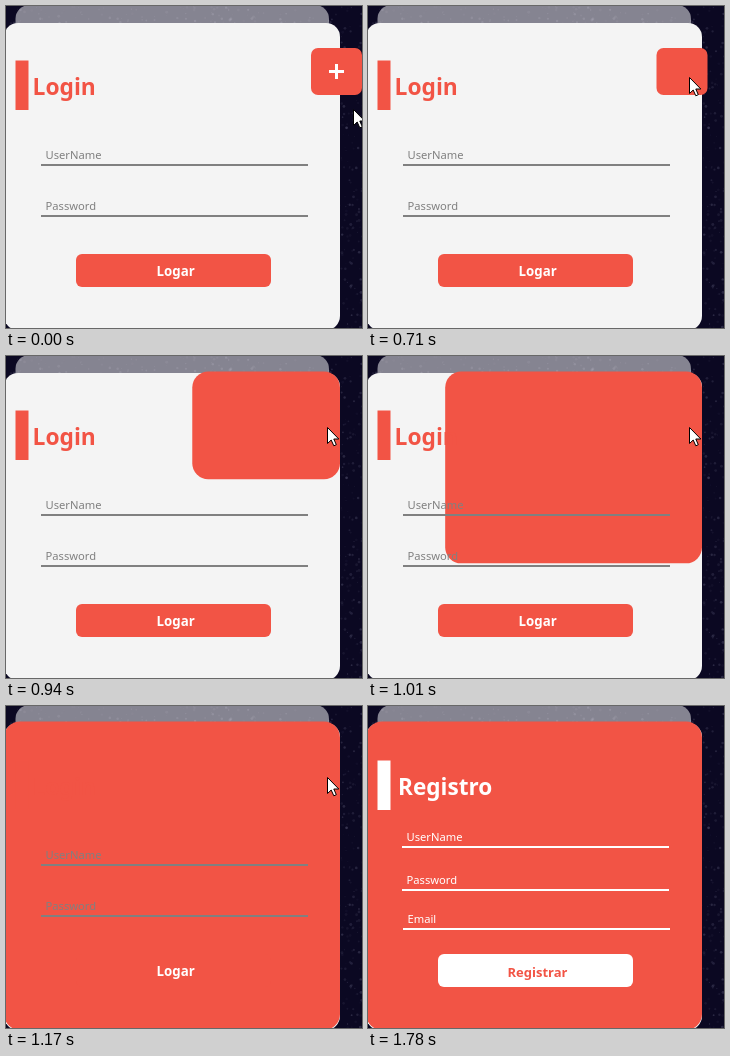
Write an HTML page with a canvas that moves like this. It is 356 px wide and 322 px high and loops after 2.48 s.

```html
<!DOCTYPE html>
<html lang="pt">
<head>
<meta charset="utf-8">
<title>Login</title>
<style>
html, body { margin: 0; width: 100%; height: 100%; overflow: hidden; background: #0b0822; }
canvas { display: block; }
</style>
</head>
<body>
<canvas id="stage" width="356" height="322"></canvas>
<script>
const c = document.getElementById('stage').getContext('2d');
const LOOP = 2480, STEP = LOOP / 32;
const RED = '#f25445', PAPER = '#f4f4f4', GRAY = '#808080', WHITE = '#fff';

// All times below are counted in steps.
const CLICK = 7, GROWN = 15, SWAP = 17, GONE = 23;

const mix = (a, b, p) => a + (b - a) * p;
const ramp = (k, from, to) => Math.min(1, Math.max(0, (k - from) / (to - from)));

// Soft start and soft end, settled at GROWN.
function grow(k, from, span) {
  if (k >= GROWN) return 1;
  return 1 - Math.exp(-((Math.max(0, k - from) / span) ** 2));
}

function rect(x, y, w, h, color, r = 0) {
  c.fillStyle = color;
  c.beginPath();
  c.roundRect(x, y, w, h, r);
  c.fill();
}

function text(s, x, y, size, color, weight, align = 'left') {
  c.font = `${weight} ${size}px "Noto Sans", "Open Sans", sans-serif`;
  c.textAlign = align;
  c.fillStyle = color;
  c.fillText(s, x, y);
}

function field(label, x, y, color) {
  text(label, x + 4.5, y - 5, 11.2, color, 400);
  rect(x, y, 267, 2, color);
}

function form(title, x, size, color) {
  rect(9.5, 54.5, 13, 49.5, color);
  text(title, x, 89, size, color, 700);
  rect(70, 248, 195, 33, color, 6);
}

function sky() {
  let seed = 7;
  const rnd = () => (seed = seed * 16807 % 2147483647) / 2147483647;
  const specks = (n, x, w, h) => {
    for (let i = 0; i < n; i++) {
      const d = 1 + 2 * rnd();
      rect(x + w * rnd(), h * rnd(), d, d, `rgba(150,150,180,${0.04 + 0.2 * rnd() ** 2})`, d / 2);
    }
  };
  rect(0, 0, 356, 322, '#0b0822');
  specks(150, 334, 22, 322);
  specks(120, 0, 334, 17);
  rect(9.5, -1, 313.5, 300, 'rgba(255,255,255,.5)', 14);
}

function redBox(k) {
  const slide = 22 * ramp(k, 6, 10), lift = ramp(k, 9, 12);
  const left = mix(305 - slide, -2, grow(k, 10.68, 2.05));
  const top = mix(42, 15.5, lift);
  const bottom = mix(89, 324, grow(k, 11.1, 2.27));
  rect(left, top, 356 - slide - left, bottom - top, RED, mix(7, 16, lift));
}

function plus() {
  rect(323, 64, 15, 3, WHITE);
  rect(329, 58, 3, 15, WHITE);
}

function loginForm() {
  form('Login', 26.5, 22.8, RED);
  field('UserName', 35, 158, GRAY);
  field('Password', 35, 209, GRAY);
  text('Logar', 169.7, 270, 13.3, WHITE, 700, 'center');
}

function registerForm() {
  form('Registro', 30, 22.6, WHITE);
  field('UserName', 34, 140, WHITE);
  field('Password', 34, 183, WHITE);
  field('Email', 35, 222, WHITE);
  text('Registrar', 169.5, 271, 13, RED, 700, 'center');
}

function pointer(k) {
  const come = 1 - (1 - ramp(k, 0, 5)) ** 2, leave = ramp(k, 21, 22);
  c.save();
  c.translate(mix(mix(347, 321, come), 37, leave) + .5, mix(mix(103, 71, come), 263, leave) + .5);
  c.fillStyle = WHITE;
  c.strokeStyle = '#000';
  const arrow = new Path2D('M0 0V16L3.7 12.5 6.3 18.3 8.8 17.2 6.3 11.5H11.3Z');
  c.fill(arrow);
  c.stroke(arrow);
  c.restore();
}

function draw(t) {
  const k = Math.floor((t + 3) % LOOP / STEP);
  sky();
  rect(-2, 17, 336, 307, PAPER, 14);
  redBox(k);
  if (k < CLICK) plus();
  if (k < SWAP) loginForm(); else registerForm();
  if (k < GONE) pointer(k);
}

const start = performance.now();
function loop() {
  draw(performance.now() - start);
  requestAnimationFrame(loop);
}
loop();
</script>
</body>
</html>
```
